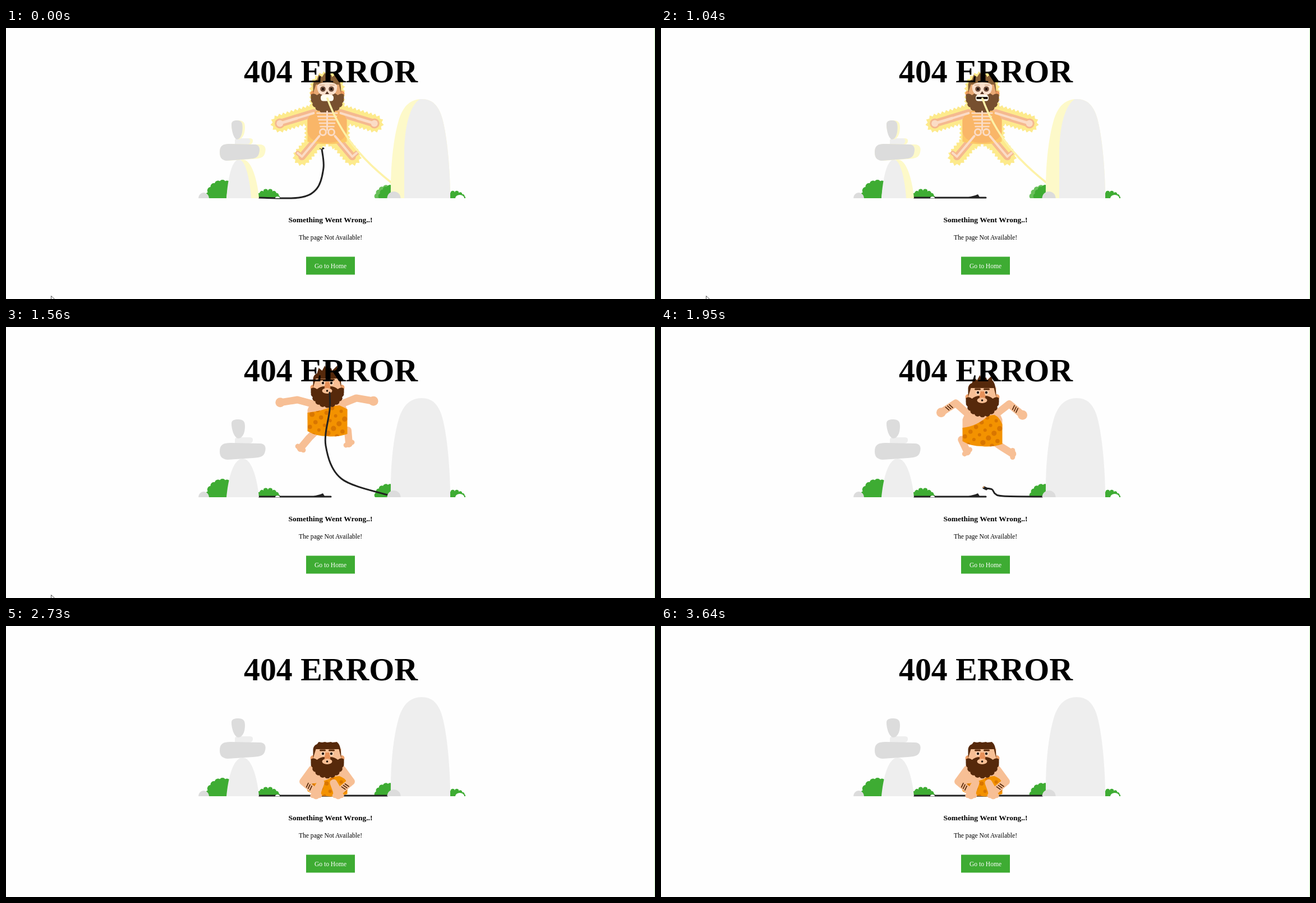
These frames come from a looping animation (1157x484 px, 3.77 s). An HTML page:

```html
<!DOCTYPE html>
<html lang="en">
<head>
<meta charset="utf-8">
<title>404 Error</title>
<style>
  html, body { margin: 0; width: 100%; height: 100%; overflow: hidden; background: #fefefe; }
  svg { display: block; }
  text { font-family: "Liberation Serif", "Times New Roman", serif; text-anchor: middle; }
</style>
</head>
<body>
<svg width="1157" height="484" viewBox="0 0 1157 484">
  <g id="scene"></g>
  <path d="M1156.5 0V484" stroke="#d3f7c9"/>
  <text x="579" y="96.5" font-size="57.8" font-weight="bold">404 ERROR</text>
  <text x="578.5" y="347" font-size="13.5" font-weight="bold">Something Went Wrong..!</text>
  <text x="578.5" y="378" font-size="11.56">The page Not Available!</text>
  <rect x="535" y="408.5" width="87" height="32" fill="#3eac33"/>
  <text x="578.5" y="428.5" font-size="11.56" fill="#fff">Go to Home</text>
  <path id="cursor" d="M80.5 478.5V491L88 485.5Z" fill="#fff" stroke="#555"/>
</svg>
<script>
const LOOP = 3770, STEP = 130, SHOCK_END = 1300, LAND = 2340;
const CENTER = 572.5, GROUND = 303;
const GREEN = '#3eac33', SKIN = '#f7bf95', HAIR = '#56290b', WIRE = '#222';
const LIGHT = '#eee', GREY = '#dcdcdc', GLOW = '#fdf9c9';
const BONE = '#fbdcc6', SHOCKED_SKIN = '#f5b98f', HALO = '#fdea8c';

// Drawing helpers
const shape = (d, fill) => `<path d="${d}" fill="${fill}"/>`;
const dot = (x, y, r, fill) => `<circle cx="${x}" cy="${y}" r="${r}" fill="${fill}"/>`;
const stroke = (d, width, color) =>
  `<path d="${d}" fill="none" stroke="${color}" stroke-width="${width}" stroke-linecap="round" stroke-linejoin="round"/>`;
const line = (points, width, color) => stroke('M' + points.join(' '), width, color);
const move = (x, y, content) => `<g transform="translate(${x} ${y})">${content}</g>`;
const twice = half => half + `<g transform="scale(-1 1)">${half}</g>`;
const dome = (x, rx, ry, fill) => shape(`M${x - rx} 304A${rx} ${ry} 0 0 1 ${x + rx} 304Z`, fill);

// Half ellipse edged with round lobes; a negative ry hangs downwards
function scallop(cx, cy, rx, ry, fill, lobes = 8) {
  const r = 0.6 * Math.PI * (rx + Math.abs(ry)) / 2 / lobes;
  let d = `M${cx - rx} ${cy}`;
  for (let i = 1; i <= lobes; i++) {
    const a = Math.PI * i / lobes;
    d += `A${r} ${r} 0 0 ${+(ry > 0)} ${cx - rx * Math.cos(a)} ${cy - ry * Math.sin(a)}`;
  }
  return shape(d + 'Z', fill);
}

// Smooth curve through a flat list of x, y
function smooth(flat) {
  const last = flat.length / 2 - 1;
  const at = i => { i = Math.min(last, Math.max(0, i)); return [flat[2 * i], flat[2 * i + 1]]; };
  let d = 'M' + at(0);
  for (let i = 0; i < last; i++) {
    const [a, b, c, e] = [-1, 0, 1, 2].map(k => at(i + k));
    d += `C${b.map((v, j) => v + (c[j] - a[j]) / 6)} ${c.map((v, j) => v - (e[j] - b[j]) / 6)} ${c}`;
  }
  return d;
}

// Motion helpers
const progress = (t, from, to) => Math.min(1, Math.max(0, (t - from) / (to - from)));
const mix = (a, b, k) => a.map((v, i) => v + (b[i] - v) * k);
const polar = ([x, y], degrees, length) => {
  const a = degrees * Math.PI / 180;
  return [x + length * Math.cos(a), y + length * Math.sin(a)];
};

// Scenery: when lit, the shaded copy of a stone leaves a bright rim on its right
function stone(d, left, color, lit, shade) {
  return lit
    ? shape(d, GLOW) + `<g transform="translate(${left} 0) scale(${shade} 1) translate(${-left} 0)">${shape(d, color)}</g>`
    : shape(d, color);
}

function bushes(lit) {
  return scallop(386, 304, 28, 31, GREEN, 9) + scallop(467, 304, 21, 13, GREEN)
    + (lit ? scallop(681, 304, 23, 22, '#68c05a') : '') + scallop(lit ? 688 : 681, 304, 23, 22, GREEN)
    + scallop(800, 304, 19, 10, GREEN) + dome(809, 8, 6, '#fefefe');
}

function leftStones(lit) {
  return dome(352.5, 9.5, 10, GREY)
    + stone('M393 304C395 282 402 236 422 235C440 235 449 280 451 304Z', 393, LIGHT, lit, 0.76)
    + stone('M413 197H435Q441 197 440 203Q439 208 433 208H408V202Q408 197 413 197Z', 408, LIGHT, lit, 0.85)
    + stone('M381 222C381 210 388 207 400 207L452 208C462 208 464 215 462 222C460 231 455 233 440 234L395 237C384 236 381 230 381 222', 381, GREY, lit, 0.87)
    + stone('M402 172C402 166 408 165 414 165C424 165 426 170 426 178C426 190 421 199 414 199C408 199 402 185 402 172', 402, GREY, lit, 0.82)
    + dome(484, 4, 3, '#fafafa');
}

function monolith(lit) {
  const right = 'C765 127 775 145 781 175C789 215 792 270 792 304Z';
  return shape('M686 304C685 250 690 200 700 165C708 138 722 127 741 127' + right, lit ? GLOW : LIGHT)
    + (lit ? shape('M710 304V218C711 175 720 138 738 127H741' + right, LIGHT) : '')
    + dome(691.5, 12, 12, GREY);
}

// Head parts, relative to the point between the eyes
function hair(lift, color) {
  let d = 'M-25 8V-8Q-24 -15 -18 -17';
  for (let i = 0; i < 4; i++) {
    const x = -17 + i * 9;
    d += `L${x + 2 + 2 * i} ${-21 - lift * (6 + 4 * (i % 2))}L${x + 8} ${-20 - lift * 2}`;
  }
  return shape(d + 'Q25 -16 25 8L21 -8H-20Z', color);
}

const beard = color => shape('M-29 10Q-24 6 -18 11Q-12 6 -5 6H6Q13 6 19 11Q25 6 30 10V18H-29Z', color)
  + scallop(0.5, 16, 28, -26, color, 9);
const ears = color => dot(-25, 8, 5, color) + dot(26, 8, 5, color);

function head(lift) {
  const eye = line([-12, -6, -4, -6], 3, HAIR) + dot(-7.5, 0, 4, '#fbd6b8') + dot(-7.5, 0, 2.2, '#1e1109');
  return ears('#efa26b') + shape('M-24 -9H25V20H-24Z', SKIN) + hair(lift, HAIR) + twice(eye) + beard(HAIR)
    + shape('M-3 -2H4L6 9Q0 13 -5 9Z', '#e79058')
    + '<ellipse cy="14" rx="9" ry="5" fill="#f7bf95"/>' + dot(0, 14, 1.8, '#1e1109');
}

function shockedHead(jawOpen) {
  const eye = dot(-7.5, 0, 4.8, '#6d4b39') + dot(-7.5, 0, 2, '#160b06') + line([-13, -7, -5, -7], 1.5, '#d9ab88');
  return ears('#ee9b5d') + shape('M-23 -10H24V20H-23Z', '#e8a873') + hair(0.8, '#875f36') + beard('#77502f')
    + shape('M-18 -4Q-17 -12 0 -12Q18 -12 18 -4Q17 9 9 10V16H-9V10Q-17 9 -18 -4Z', '#fae0cc')
    + twice(eye) + shape('M0 4L3.5 9H-3.5Z', '#52301f')
    + '<rect x="-11.5" y="10.5" width="23" height="11" rx="4.5" fill="#fffdf0"/>'
    + (jawOpen ? '<rect x="-10" y="14" width="20" height="4" fill="#1c120c"/>' : '');
}

// Capsule outline with alternating teeth
function spiky(x1, y1, x2, y2, r) {
  const length = Math.hypot(x2 - x1, y2 - y1), dir = Math.atan2(y2 - y1, x2 - x1);
  const half = length + Math.PI * r, teeth = Math.round(half / 3.75);
  const points = [];
  for (let i = 0; i < 2 * teeth; i++) {
    const back = i >= teeth, s = (i % teeth) / teeth * half;
    const along = Math.min(1, s / length), k = back ? 1 - along : along;
    const angle = dir - Math.PI / 2 + Math.max(0, s - length) / r + (back ? Math.PI : 0);
    const reach = i % 2 ? r + 4 : r;
    points.push(x1 + (x2 - x1) * k + Math.cos(angle) * reach, y1 + (y2 - y1) * k + Math.sin(angle) * reach);
  }
  return shape('M' + points.join(' ') + 'Z', HALO);
}

function shockedMan(jawOpen) {
  const shoulder = [-24, 43], hip = [-14, 84];
  const elbow = polar(shoulder, 163, 31), hand = polar(shoulder, 163, 63);
  const knee = polar(hip, 130, 22), ankle = polar(hip, 130, 48), toe = polar(ankle, 220, 10);
  const limbs = line([shoulder, hand], 14, SHOCKED_SKIN) + dot(...hand, 9, SHOCKED_SKIN)
    + line([hip, ankle], 13, SHOCKED_SKIN) + line([ankle, toe], 8, SHOCKED_SKIN);
  const bones = line([shoulder, elbow], 4, BONE) + line([elbow, hand], 5, BONE) + dot(...hand, 6, BONE)
    + line([hip, knee], 4, BONE) + line([knee, ankle, toe], 4, BONE)
    + `<circle cx="-7.5" cy="77" r="5.5" fill="none" stroke="${BONE}" stroke-width="3"/>`;
  let ribs = line([0, 40, 0, 73], 3, BONE);
  for (let i = 0; i < 5; i++) ribs += line([1.5 * i - 18, 43 + 6 * i, 18 - 1.5 * i, 43 + 6 * i], 2.5, BONE);
  const halo = twice(spiky(...shoulder, ...hand, 13) + spiky(...hip, ...ankle, 13) + spiky(-18, 46, -18, 86, 19))
    + spiky(0, 0, 0, 60, 28);
  return move(CENTER, 109, halo + twice(limbs)
    + shape('M-35 94V55Q-29 37 0 37Q29 37 35 55V94Q0 103 -35 94Z', '#fcc768')
    + shape('M-35 77V55Q-29 37 0 37Q29 37 35 55V77Q31 96 0 96Q-31 96 -35 77Z', '#f9b668')
    + twice(bones) + shockedHead(jawOpen) + ribs);
}

// body: eye level, lift, hem, neckline, tattoo opacity
// arms and legs: joint angles in degrees, left limb first
const JUMP = { body: [100, 1, 95, 53, 0], arms: [195, 171, -22, 10], legs: [135, 130, 35, -5, 85, -25] };
const FALL = { body: [117, 1, 96, 63, 1], arms: [222, 147, -38, 40], legs: [190, 65, 140, 35, 32, 90] };
const SIT = { body: [228, 0, 76, 55, 1], arms: [126, 40, 54, 140], legs: [-60, 110, 0, -120, 70, 0] };

function mixPose(a, b, k) {
  return { body: mix(a.body, b.body, k), arms: mix(a.arms, b.arms, k), legs: mix(a.legs, b.legs, k) };
}

function arm(shoulder, upper, fore, tattooOpacity) {
  const elbow = polar(shoulder, upper, 27), hand = polar(elbow, fore, 31);
  let tattoo = '';
  for (const along of [10, 14, 18]) {
    const p = polar(elbow, fore, along);
    tattoo += line([polar(p, fore + 75, 4), polar(p, fore - 105, 4)], 1.7, HAIR);
  }
  return line([shoulder, elbow, hand], 13, SKIN) + dot(...hand, 8.5, SKIN)
    + `<g opacity="${tattooOpacity}">${tattoo}</g>`;
}

function leg(hip, thigh, shin, foot) {
  const knee = polar(hip, thigh, 17), ankle = polar(knee, shin, 24);
  return line([hip, knee, ankle], 13, SKIN) + line([polar(ankle, foot, -6), polar(ankle, foot, 6)], 9, SKIN);
}

function caveman({ body: [y, lift, hem, neck, tattoo], arms, legs }) {
  const dress = `M-35 ${neck}Q-8 ${neck - 3} 11 41L22 40Q31 44 36 ${neck - 6}V${hem - 4}Q18 ${hem + 2} 0 ${hem}Q-20 ${hem} -35 ${hem - 9}Z`;
  let spots = '';
  for (let i = 0; i < 20; i++) spots += dot(-33 + 68 * (i * 0.618 % 1), 42 + 2.8 * i, 3 + i % 3 * 0.8, '#d97600');
  const torso = shape('M-35 66V48Q-28 26 0 26Q29 26 36 48V66Z', SKIN)
    + `<clipPath id="dress"><path d="${dress}"/></clipPath>` + shape(dress, '#f39200')
    + `<g clip-path="url(#dress)">${spots}</g>`;
  const shoulderY = 28 + 9 * lift;
  const bothArms = arm([-27, shoulderY], arms[0], arms[1], tattoo) + arm([27, shoulderY], arms[2], arms[3], tattoo);
  const bothLegs = leg([-20, hem - 9], ...legs.slice(0, 3)) + leg([20, hem - 9], ...legs.slice(3));
  return move(CENTER, y, (lift > 0.5 ? bothLegs + bothArms + torso : torso + bothArms + bothLegs) + head(lift));
}

function leftCable(t) {
  const raised = [451, GROUND, 522, GROUND, 554, 287, 566, 250, 563, 216];
  const fallen = [451, GROUND, 490, GROUND, 525, GROUND, 555, GROUND, 579, GROUND];
  const k = 1 - (1 - progress(t, 0, 390)) ** 2;
  const points = mix(raised, fallen, k), [x, y] = points.slice(-2);
  return stroke(smooth(points), 3, WIRE)
    + (k < 1 ? line([x - 3, y - 1, x + 3, y - 1], 3, WIRE)
      : shape(`M548 302L560 299L565 ${t < 1040 ? 294.5 : 297}L568 302Z`, WIRE));
}

function rightCable(t) {
  if (t < SHOCK_END) return stroke('M573 126C597 192 636 236 688 277', 3.6, '#fdf2a8');
  const hanging = [577, 117, 577, 148, 570, 212, 598, 271, 680, 300];
  const curled = [578, 288, 590, 290, 596, 298, 610, 302, 680, GROUND];
  const flat = curled.map((v, i) => i % 2 ? GROUND : v);
  const points = mix(mix(hanging, curled, progress(t, 1560, 1950) ** 1.5), flat, progress(t, 1950, 2210));
  const [x, y] = points;
  return stroke(smooth(points), 3, WIRE)
    + (t > 1560 && t < 2210 ? line([x - 2, y - 1, x + 2, y + 1], 5, WIRE) + dot(x - 3, y - 2, 1.3, '#e89a50') : '')
    + (t >= 2210 ? line([560, GROUND, x, GROUND], 3, WIRE) : '');
}

function man(t) {
  if (t < SHOCK_END) return shockedMan(t >= 910);
  const falling = mixPose(JUMP, FALL, progress(t, 1560, 1950) ** 1.6);
  return caveman(mixPose(falling, SIT, progress(t, 1950, LAND) ** 1.3));
}

function draw(t) {
  const lit = t < SHOCK_END;
  const actors = t < 1950 ? man(t) + rightCable(t) : rightCable(t) + man(t);
  document.getElementById('scene').innerHTML = bushes(lit) + leftCable(t) + leftStones(lit) + actors + monolith(lit);
  document.getElementById('cursor').style.display = t < 1820 ? '' : 'none';
}

const start = performance.now();
let shown = -1;
function tick() {
  const t = Math.floor((performance.now() - start) % LOOP / STEP) * STEP;
  if (t !== shown) draw(shown = t);
  requestAnimationFrame(tick);
}
tick();
</script>
</body>
</html>
```
